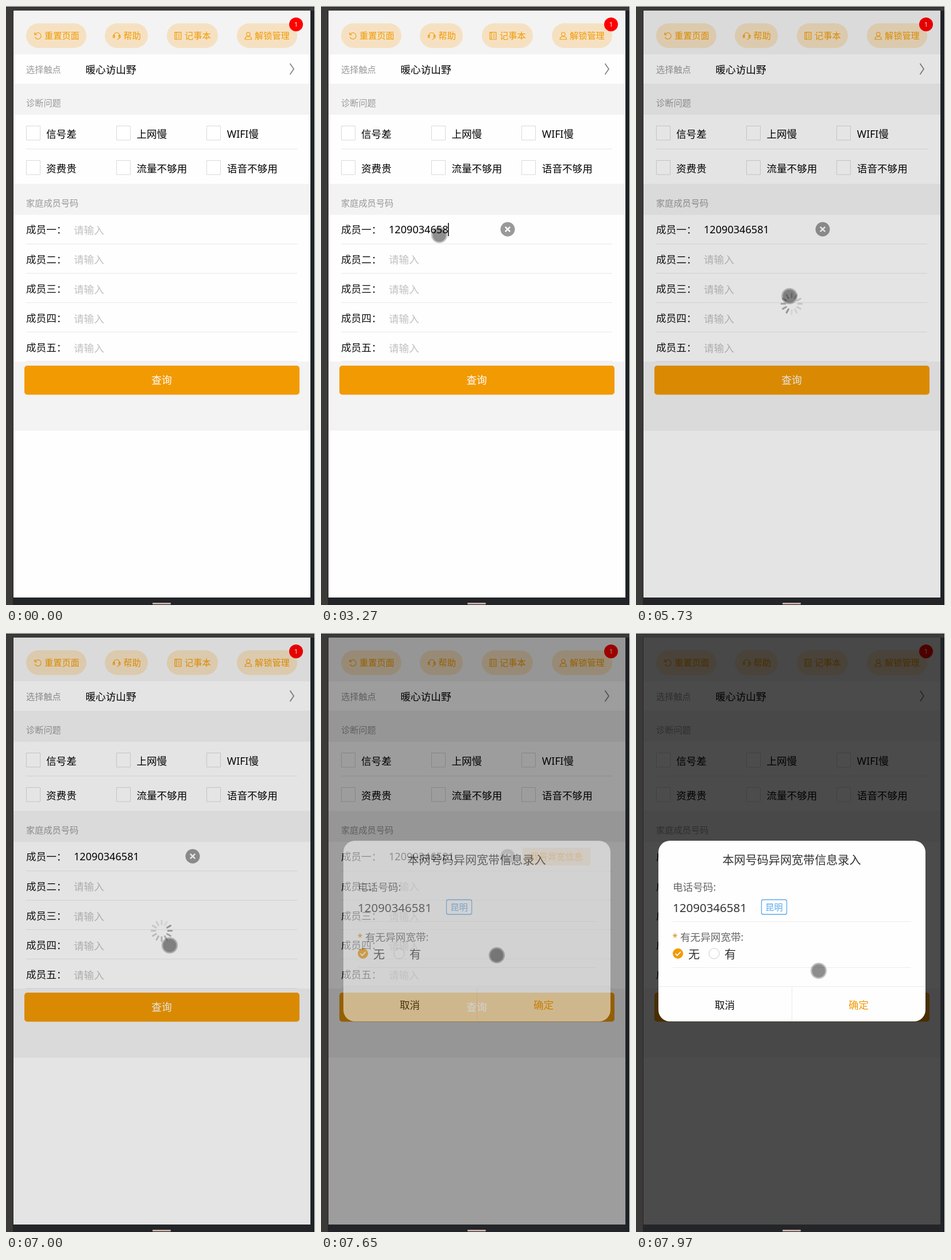
Animation of 538x1041 px, one loop 8 s. Source, as an HTML page with a canvas:

```html
<!DOCTYPE html>
<html lang="zh-CN">
<head>
<meta charset="utf-8">
<style>
html, body { margin: 0; width: 100%; height: 100%; overflow: hidden; background: #3b3a39; }
canvas { display: block; }
</style>
</head>
<body>
<canvas id="stage" width="538" height="1041"></canvas>
<script>
const W = 538, H = 1041, LOOP = 8000;
const FONT = '"Noto Sans", "Noto Sans CJK SC", "Noto Sans CJK", sans-serif';
const ORANGE = '#f29a02', GREY = '#f3f3f3', CHIP = '#f5e1c2', HINT = '#c0c0c0';
const PHONE = '12090346581';
const KEY_TIMES = [1340, 1430, 1700, 1900, 2340, 2500, 2700, 2870, 3100, 3270, 3500];
const FOCUS = 760, LOAD_IN = 3960, LOAD_OUT = 7220, DIALOG_IN = 7555;

// time, x, y
const POINTER = [
  [220, 481, 961], [330, 420, 800], [450, 310, 560], [570, 238, 440], [690, 206, 398],
  [4310, 206, 398], [4420, 198, 385], [4530, 189, 394], [4630, 200, 413],
  [5130, 228, 425], [5500, 255, 478], [6010, 282, 536], [6450, 291, 548],
  [7000, 285, 543], [7350, 292, 549], [7650, 306, 560], [7970, 318, 587]
];

const stage = document.getElementById('stage').getContext('2d');
const sheet = document.createElement('canvas');
sheet.width = W;
sheet.height = H;
const sheetCtx = sheet.getContext('2d');
let g = stage;

const clamp = v => Math.max(0, Math.min(1, v));
const ramp = (t, start, length) => clamp((t - start) / length);

// CSS "ease": cubic-bezier(.25, .1, .25, 1)
function ease(x) {
  if (x <= 0 || x >= 1) return clamp(x);
  let lo = 0, hi = 1;
  const bez = (a, b, s) => 3 * a * s * (1 - s) ** 2 + 3 * b * s * s * (1 - s) + s ** 3;
  for (let i = 0; i < 20; i++) {
    const mid = (lo + hi) / 2;
    if (bez(.25, .25, mid) < x) lo = mid; else hi = mid;
  }
  return bez(.1, 1, lo);
}

function box(x, y, x2, y2, color) {
  g.fillStyle = color;
  g.fillRect(x, y, x2 - x, y2 - y);
}

function round(x, y, x2, y2, r, fill, stroke, width = 1) {
  g.beginPath();
  g.roundRect(x, y, x2 - x, y2 - y, r);
  if (fill) { g.fillStyle = fill; g.fill(); }
  if (stroke) { g.strokeStyle = stroke; g.lineWidth = width; g.stroke(); }
}

function disc(x, y, r, fill) {
  g.beginPath();
  g.arc(x, y, r, 0, 7);
  g.fillStyle = fill;
  g.fill();
}

function line(points, color, width) {
  g.beginPath();
  points.forEach(([x, y]) => g.lineTo(x, y));
  g.strokeStyle = color;
  g.lineWidth = width;
  g.stroke();
}

function label(s, x, cy, size, color, align = 'left') {
  g.font = `${size}px ${FONT}`;
  g.textAlign = align;
  g.fillStyle = color;
  g.fillText(s, x, cy + size * .38);
}

function icon(path, x, y) {
  g.save();
  g.translate(x, y);
  g.strokeStyle = ORANGE;
  g.lineWidth = 1.1;
  g.stroke(new Path2D(path));
  g.restore();
}

function header() {
  const chips = [
    [35, 140, 67, '重置页面', 49, 'M1 1V5H5M1.5 5A5.5 5.5 0 1 1 1.5 9'],
    [172, 247, 204.5, '帮助', 186, 'M2 8V6A4.7 4.7 0 0 1 11.5 6V8M2 6H.6V10H3V6ZM11.5 6H13V10H10.5V6ZM11.5 10Q11 13 7 13'],
    [280, 369, 311, '记事本', 293, 'M1 .6H12V13H1ZM3.6 .6V13M6 4H10M6 7H10M6 10H10'],
    [402, 507, 433, '解锁管理', 415, 'M10 4A3.2 3.2 0 1 1 3.6 4A3.2 3.2 0 1 1 10 4M1 13Q1 8 6.8 8T12.6 13Z']
  ];
  for (const [x, x2, textX, name, iconX, path] of chips) {
    round(x, 30, x2, 73, 21.5, CHIP);
    icon(path, iconX, 45);
    label(name, textX, 51.5, 15.2, ORANGE);
  }
  disc(505, 32, 12, '#f00');
  label('1', 505, 32.2, 10.5, '#fff', 'center');
}

function page(t, typed) {
  box(0, 0, W, H, '#3b3a39');
  box(12, 1028, W, H, '#232529');
  box(530, 8, W, H, '#202327');
  box(12, 7, 13, 1028, '#262626');
  box(537, 0, W, H, '#f4f4f4');
  box(0, 0, W, 1, '#d8d8d8');
  round(255, 1037, 287, 1040, 1, '#c4aaa5');
  box(13, 8, 530, 1028, '#fefefe');
  for (const [y, y2] of [[8, 84], [135, 189], [309, 363], [618, 738]]) box(13, y, 530, y2, GREY);

  header();
  label('选择触点', 35, 110.5, 15.2, '#999');
  label('暖心访山野', 138.5, 110.5, 17.6, '#000');
  line([[494.5, 100], [501, 109.5], [494.5, 119]], '#888', 1.8);
  label('诊断问题', 35, 168.5, 15.2, '#999');
  label('家庭成员号码', 35, 342.5, 15.2, '#999');

  const issues = ['信号差', '上网慢', 'WIFI慢', '资费贵', '流量不够用', '语音不够用'];
  issues.forEach((name, i) => {
    const x = 35.5 + i % 3 * 157, y = i < 3 ? 208.5 : 268.5;
    round(x, y, x + 24, y + 24.5, 0, '#fff', '#d9d9d9');
    label(name, 70 + i % 3 * 157.4, y + 13.5, 17.6, '#000');
  });
  box(35, 248, 507, 249, '#e8e8e8');

  [...'一二三四五'].forEach((n, i) => {
    const y = 388.8 + i * 51.15;
    label(`成员${n}：`, 35, y, 17.6, '#111');
    if (i || !typed) label('请输入', 118, y + .8, 17.6, HINT);
    box(35, Math.round(y + 24), 507, Math.round(y + 25), '#e8e8e8');
  });

  if (typed) {
    label(PHONE.slice(0, typed), 118, 388.6, 18.1, '#000');
    disc(325, 388, 12.5, '#999');
    line([[320.8, 383.8], [329.2, 392.2]], '#fff', 2.6);
    line([[329.2, 383.8], [320.8, 392.2]], '#fff', 2.6);
  }
  if (t >= 7480) {
    round(351, 373, 469, 404, 4, CHIP);
    label('我号异宽信息', 364.5, 388.5, 15.2, ORANGE);
  }
  round(32, 625, 511, 675.5, 5, ORANGE);
  label('查询', 271, 650.5, 17.8, '#fff', 'center');
}

function caret(t, typed) {
  const lastKey = typed ? KEY_TIMES[typed - 1] : FOCUS;
  if (t < FOCUS || t >= LOAD_IN || t - lastKey >= 500) return;
  g.font = `18.1px ${FONT}`;
  const x = 118 + g.measureText(PHONE.slice(0, typed)).width;
  box(x - .5, 377, x + 1, 400, '#000');
}

function spinner(t, alpha) {
  const head = 3 + Math.floor((t - 4615) / (800 / 12));
  g.save();
  g.globalAlpha = alpha;
  g.translate(271, 517.5);
  for (let i = 0; i < 12; i++) {
    const v = Math.round(146 + 66 * (i / 11) ** .8);
    g.save();
    g.rotate((head + i) * Math.PI / 6);
    round(-1.5, -19.3, 1.5, -9.6, 1.5, `rgb(${v},${v},${v})`);
    g.restore();
  }
  g.restore();
}

function drawDialog() {
  g = sheetCtx;
  g.clearRect(0, 0, W, H);
  round(39, 361, 504, 675, 20, '#fefefe');
  label('本网号码异网宽带信息录入', 271, 394, 20.1, '#333', 'center');
  label('电话号码:', 64, 441, 17.6, '#666');
  label(PHONE, 64, 477, 20.5, '#333');
  round(218.5, 463.5, 262.5, 489, 3, null, '#5aa9ee', 1.3);
  label('昆明', 240.5, 476.5, 15.2, '#5aa9ee', 'center');
  label('*', 63.5, 528, 16, '#d98500');
  label('有无异网宽带:', 77, 528, 17.6, '#666');
  disc(73, 557, 9, ORANGE);
  line([[68.5, 557], [71.7, 560.4], [77.8, 554]], '#fff', 1.8);
  round(127, 548, 145, 566, 9, '#fff', '#ccc');
  label('无', 91, 558, 20.1, '#333');
  label('有', 154, 558, 20.1, '#333');
  for (const y of [501, 581]) box(64, y, 479, y + 1, '#ebebeb');
  box(39, 614, 504, 615, '#ebebeb');
  box(271, 615, 272, 675, '#ebebeb');
  label('取消', 154.5, 646, 17.6, '#111', 'center');
  label('确定', 387.5, 646, 17.6, ORANGE, 'center');
  g = stage;
}

function pointer(t) {
  if (t < POINTER[0][0]) return;
  const next = POINTER.findIndex(p => p[0] > t);
  const b = POINTER[next < 0 ? POINTER.length - 1 : next];
  const a = next < 0 ? b : POINTER[next - 1];
  const k = a === b ? 0 : (t - a[0]) / (b[0] - a[0]);
  const x = a[1] + (b[1] - a[1]) * k, y = a[2] + (b[2] - a[2]) * k;
  g.beginPath();
  g.arc(x, y, 14, 0, 2 * Math.PI);
  g.arc(x, y, 11.6, 0, 2 * Math.PI, true);
  g.fillStyle = 'rgba(0,0,0,.25)';
  g.fill();
  disc(x, y, 11.6, 'rgba(0,0,0,.44)');
}

function draw(t) {
  const typed = KEY_TIMES.filter(k => t >= k).length;
  page(t, typed);
  caret(t, typed);

  const loading = ease(ramp(t, LOAD_IN, 300)) * (1 - ease(ramp(t, LOAD_OUT, 260)));
  if (loading > 0) {
    box(13, 8, 530, 1028, `rgba(0,0,0,${.1 * loading})`);
    spinner(t, loading);
  }
  const shown = ease(ramp(t, DIALOG_IN, 300));
  if (shown > 0) {
    box(13, 8, 530, 1028, `rgba(0,0,0,${.7 * shown})`);
    g.globalAlpha = shown;
    g.drawImage(sheet, 0, 0);
    g.globalAlpha = 1;
  }
  pointer(t);
}

drawDialog();
const start = performance.now();
function tick() {
  draw((performance.now() - start) % LOOP);
  requestAnimationFrame(tick);
}
tick();
</script>
</body>
</html>
```
